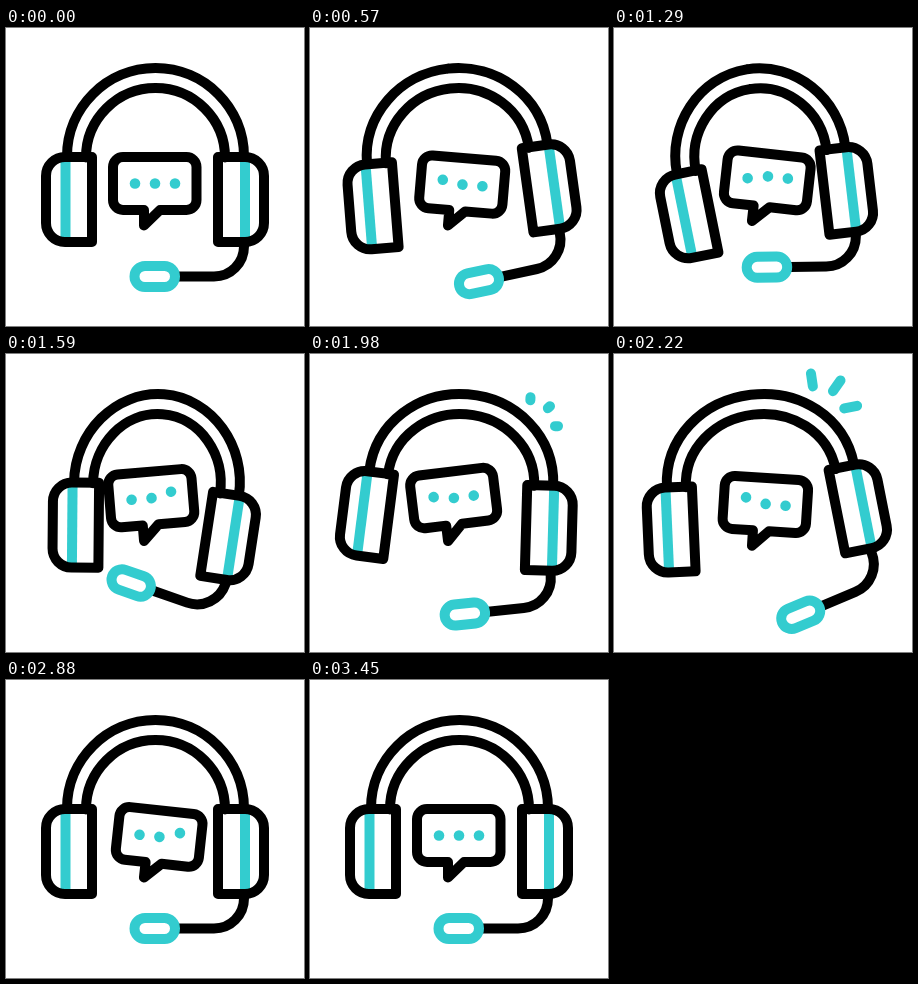
An HTML page that plays this animation: 298x298 px, repeating every 3.6 s.

```html
<!DOCTYPE html>
<html lang="en">
<head>
<meta charset="utf-8">
<title>Headset</title>
<style>
  html, body { margin: 0; width: 100%; height: 100%; overflow: hidden; background: #fff; }
  svg { display: block; width: 100vw; height: 100vh; }
  .line { fill: none; stroke: #000; stroke-width: 10; stroke-linecap: round; stroke-linejoin: round; }
  .teal { stroke: #33cccf; }
  .flat { stroke-linecap: butt; }
  .dot { fill: #33cccf; }
</style>
</head>
<body>
<svg viewBox="0 0 298 298">
  <g id="head">
    <path id="band" class="line"/>
    <g id="left">
      <path class="line teal flat" d="M59.5 133V210"/>
      <path class="line" d="M86 129V214H59A19 19 0 0 1 40 195V148A19 19 0 0 1 59 129Z"/>
    </g>
    <g id="right">
      <g id="mic">
        <path class="line flat" d="M172 248.5H208A30 30 0 0 0 238 218.5V214"/>
        <rect class="line teal" x="128.5" y="238" width="40.5" height="21" rx="10.5"/>
      </g>
      <path class="line teal flat" d="M239 133V210"/>
      <path class="line" d="M212 129V214H239A19 19 0 0 0 258 195V148A19 19 0 0 0 239 129Z"/>
    </g>
    <path id="sparks" class="line teal"/>
  </g>
  <g id="bubble">
    <rect class="line" x="107" y="129" width="83.5" height="53" rx="10" visibility="hidden"/>
    <path class="line" d="M117 129H180.5A10 10 0 0 1 190.5 139V172A10 10 0 0 1 180.5 182H154L138 197.5V182H117A10 10 0 0 1 107 172V139A10 10 0 0 1 117 129Z"/>
    <circle class="dot" cx="129" r="5.3"/>
    <circle class="dot" cx="149" r="5.3"/>
    <circle class="dot" cx="169" r="5.3"/>
  </g>
</svg>
<script>
const LOOP = 3600, STEP = 30, CX = 149.5, HINGE_Y = 50;
const $ = id => document.getElementById(id);
const dots = document.querySelectorAll('.dot');
const rad = deg => deg * Math.PI / 180;
const ramp = (t, from, to) => Math.min(1, Math.max(0, (t - from) / (to - from)));

// Swings through turning points [ms, value], easing along a cosine between them.
function swing(t, ...turns) {
  let v = turns[0][1];
  for (let i = 1; i < turns.length; i++) {
    const u = ramp(t, turns[i - 1][0], turns[i][0]);
    v += (turns[i][1] - turns[i - 1][1]) * (1 - Math.cos(Math.PI * u)) / 2;
  }
  return v;
}

const rotate = (id, angle, x, y, dy = 0) =>
  $(id).setAttribute('transform', `translate(0 ${dy}) rotate(${angle} ${x} ${y})`);

// Half an arch: level at the top, its foot turned outward with the ear cup.
function halfArch(r, top, side, open) {
  const c = Math.cos(rad(open)), s = Math.sin(rad(open)), k = 0.5523 * r;
  const turned = y => {
    const dy = y - HINGE_Y;
    return `${CX + side * (r * c + dy * s)} ${HINGE_Y + dy * c - r * s}`;
  };
  return `M${CX} ${top}C${CX + side * k} ${top} ${turned(top + r - k)} ${turned(top + r)}`;
}

function bandPath(open) {
  return [-1, 1].map(side => halfArch(88.5, 40, side, open) + halfArch(69.5, 60, side, open)).join('');
}

function sparkPath(t) {
  const from = 26 + 15 * ramp(t, 2160, 2640), to = 26 + 15 * ramp(t, 1920, 2220);
  if (to - from < 0.3) return '';
  return [-1.5, 42, 85.5].map(deg => {
    const at = r => `${213 + r * Math.sin(rad(deg))} ${67 - r * Math.cos(rad(deg))}`;
    return `M${at(from)}L${at(to)}`;
  }).join('');
}

// Each dot hops twice, one after the other.
function dotLift(t, i) {
  const hop = start => Math.sin(Math.PI * ramp(t, start, start + 640));
  return 6 * (hop(460 + 340 * i) + hop(1860 + 340 * i));
}

function draw(t) {
  const tilt = swing(t, [330, 0], [940, -18.5], [1815, 8.8], [2300, -8], [2640, 0]);
  const open = swing(t, [330, 0], [870, 4.1], [1500, -4.5], [2170, 4.5], [2650, 0]);
  const sway = swing(t, [330, 0], [930, 14], [1850, -9], [2460, 10], [3450, 0]);
  const lift = swing(t, [930, 0], [1780, -12], [2640, 0]);

  rotate('head', tilt, CX, 147);
  rotate('left', open, CX, HINGE_Y);
  rotate('right', -open, CX, HINGE_Y);
  rotate('mic', -2.6 * open, 238, 219);
  rotate('bubble', sway, 138, 197, lift);
  $('band').setAttribute('d', bandPath(open));
  $('sparks').setAttribute('d', sparkPath(t));
  dots.forEach((dot, i) => dot.setAttribute('cy', 155.5 - dotLift(t, i)));
}

const begin = performance.now();
function tick() {
  const t = (performance.now() - begin) % LOOP;
  draw(Math.floor(t / STEP) * STEP);
  requestAnimationFrame(tick);
}
tick();
</script>
</body>
</html>
```
